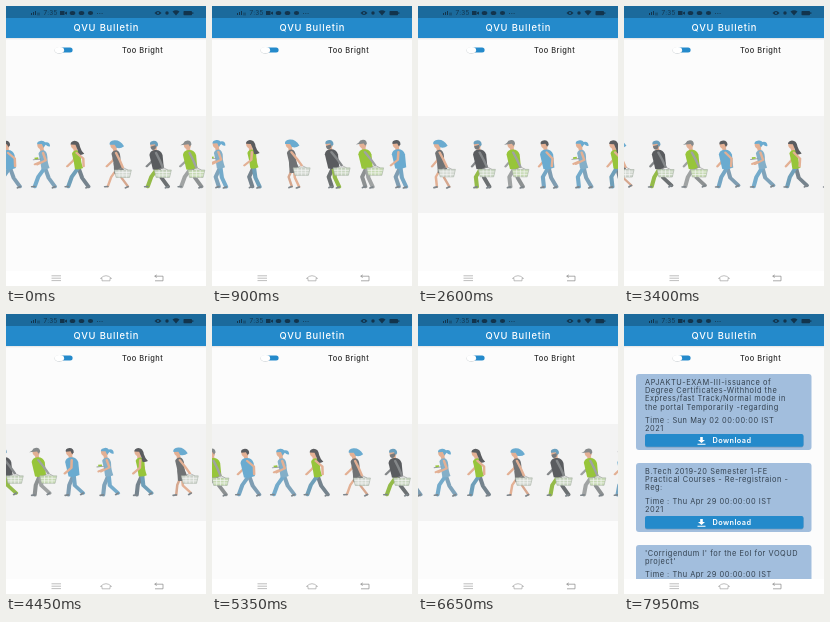
These frames come from a looping animation (200x280 px, 8 s). An HTML page:

```html
<!DOCTYPE html>
<html lang="en">
<head>
<meta charset="utf-8">
<title>Notices</title>
<style>
  html, body { margin: 0; width: 100%; height: 100%; overflow: hidden; background: #fcfcfc; }
  svg { display: block; width: 100%; height: 100%; }
  text { font-family: Inter, Roboto, sans-serif; }
  .body { font-size: 7.4px; letter-spacing: .54px; fill: #33414f; }
  .btn { font-size: 7.3px; font-weight: 600; letter-spacing: .45px; fill: #fff; }
  .limb { fill: none; stroke-linecap: round; stroke-linejoin: round; }
</style>
</head>
<body>
<svg viewBox="0 0 200 280">
  <defs>
    <clipPath id="stage"><rect y="110" width="200" height="97"/></clipPath>
    <linearGradient id="shade" x2="0" y2="1">
      <stop stop-color="#000" stop-opacity=".1"/><stop offset="1" stop-color="#000" stop-opacity="0"/>
    </linearGradient>
  </defs>
  <rect width="200" height="280" fill="#fcfcfc"/>

  <g id="walk" clip-path="url(#stage)">
    <rect y="110" width="200" height="97" fill="#f3f3f3"/>
    <g id="belt"><g id="row"></g><use href="#row" x="215"/></g>
  </g>
  <g id="list"></g>

  <rect y="32" width="200" height="2" fill="url(#shade)"/>
  <rect width="200" height="32" fill="#248acb"/>
  <rect width="200" height="12" fill="#1b6a9c"/>
  <text x="100.400" y="24.600" text-anchor="middle" font-size="9.4" font-weight="500" letter-spacing=".8" fill="#fff">QVU Bulletin</text>

  <g id="status" fill="#12344d">
    <path d="M25 9V7h1v2zM27 9V6h1v3zM29 9V5h1v4z"/>
    <path d="M31 7.2h3M31 8.8h3" stroke="#12344d" stroke-width=".6"/>
    <text x="37.5" y="9.4" font-size="6.4" letter-spacing=".3">7:35</text>
    <path d="M54 5h4.5v4H54zM59 6.4l2-1v3.4l-2-1z"/>
    <ellipse cx="66.5" cy="7" rx="2.8" ry="2.1"/>
    <ellipse cx="75.5" cy="7" rx="2.8" ry="2.1"/>
    <ellipse cx="84.5" cy="7" rx="2.6" ry="2"/>
    <path d="M91 7h1v.8h-1zM93.300 7h1v.8h-1zM95.600 7h1v.8h-1z"/>
    <path d="M148.500 7q3.500-4 7 0q-3.500 4-7 0z"/>
    <circle cx="152" cy="7" r="1" fill="#1b6a9c"/>
    <circle cx="161" cy="7" r="1.7"/>
    <path d="M166.500 5.500q3.500-2.600 7 0L170 9.500z"/>
    <rect x="177.500" y="5" width="8.500" height="4.200" rx=".8"/>
    <rect x="186.300" y="6.200" width="1" height="1.800"/>
  </g>

  <rect x="52" y="41.600" width="14.600" height="5" rx="2.500" fill="#248acb"/>
  <ellipse cx="53.300" cy="44.400" rx="4.900" ry="3.300" fill="#d0d5d8"/>
  <ellipse cx="53.300" cy="44" rx="4.700" ry="3.100" fill="#fff"/>
  <text x="116" y="46.600" font-size="7.4" font-weight="500" letter-spacing=".5" fill="#2a2a2a">Too Bright</text>

  <rect y="265" width="200" height="15" fill="#fff"/>
  <g fill="none" stroke="#a2a2a2" stroke-width=".7">
    <path d="M45.500 269.800h9.500M45.500 272.200h9.500M45.500 274.600h9.500"/>
    <path d="M96 274.800v-2.400h-1.500q5.500-5.400 11 0h-1.500v2.400z"/>
    <path d="M149 270.200h8v4.600h-8M150.800 268.900l-2.200 1.300l2.200 1.300" stroke="#888"/>
  </g>
</svg>
<script>
const LOOP = 8000, LIST_AT = 7250, SPEED = 34, PERIOD = 215, STEP = 334, LEAN = 8;
const $ = id => document.getElementById(id);
const SKIN = '#e3b094', BLUE = '#6aabd0', GREEN = '#97c53a', DARK = '#5a5c5f', GREY = '#9fa2a2', SHOE = '#7d858b';

// x: place in the row; hold: what the hands carry; legs: far, near
const people = [
  { x: 4, hair: DARK, top: BLUE, arm: SKIN, legs: ['#7f9db2', '#75a6c4'], style: 'short', broad: true },
  { x: 39, hair: BLUE, top: '#84afc8', arm: SKIN, legs: ['#7fa3ba', '#74abcb'], style: 'bun', hold: 'tray' },
  { x: 72.5, hair: DARK, top: GREEN, arm: SKIN, legs: ['#75838d', '#6f9fb9'], style: 'long' },
  { x: 112, hair: BLUE, top: '#707274', arm: SKIN, legs: ['#d6a78e', SKIN], style: 'bob', hold: '#d3d9d1', dress: true },
  { x: 152, hair: '#6a9fbd', top: DARK, arm: '#85888a', legs: ['#6c7072', '#94bb48'], style: 'short', beard: true, broad: true, hold: '#c8d6bf' },
  { x: 185.5, hair: '#868a8b', top: GREEN, arm: GREY, legs: ['#8d9192', '#a0a3a3'], style: 'cap', broad: true, hold: '#c6dab2' },
];

const hairs = {
  short: 'M-3-23.500Q-3.400-27 .400-27Q3.800-26.600 3.200-22L1.600-20.500L.800-23.500Z',
  bun: 'M-3-24Q-2.600-27 .600-27Q3-27 3.600-25Q7.500-25.500 7-20.500Q5-20 3.800-22.500L1.600-20L.800-23.600Z',
  long: 'M-3-23.800Q-2.600-27 .600-27Q4.400-26.500 4.200-20Q4.500-16 6.500-13Q3.500-11.500 2-13Q2-18 .800-23Z',
  bob: 'M-3.400-23.500Q-3.600-27.400 1-27.400Q5.500-27.200 7.800-20.500Q4.500-18 1.600-19.800L.600-23Z',
  cap: 'M-5.600-23.400Q-3.400-24.600-3-25Q-2-27.400 .600-27.200Q3.600-27 3.200-22.800L1.600-21L.800-23.400Z',
};
const BROAD = 'M-5-13.500Q-4-17.500 0-17.700Q4.600-17.700 5.400-12L4.600 1Q0 3-4.300 1.200Z';
const SLIM = 'M-3.200-14.500Q-2-17.500 1-17.300Q4-16.500 3.400-10Q2.600-6 3.600 1Q0 2.600-3 1Q-2.600-7-3.200-14.500Z';

const limb = (color, w) => `<path class="limb" stroke="${color}" stroke-width="${w}"/>`;
const solid = (d, color) => `<path d="${d}" fill="${color}"/>`;

function figure(p) {
  const leg = c => limb(c, p.dress ? 2 : 3.3) + limb(SHOE, 1.6);
  const basket = p.hold && p.hold !== 'tray'
    ? `<g class="basket"><path d="M-4 2.500L0 0L4 2.500" fill="none" stroke="#999" stroke-width=".6"/>
       <path d="M-6.800 2.500H6.800L5.400 10H-5.400Z" fill="${p.hold}" stroke="#a3ada0" stroke-width=".5"/>
       <path d="M-6 5H6M-5.600 7.500H5.600M-3 2.500V10M0 2.500V10M3 2.500V10" stroke="#f6f6f6" stroke-width=".6"/></g>` : '';
  const tray = p.hold === 'tray'
    ? `<path d="M-8.500-9H-2" stroke="#8f989e" stroke-width=".9"/>` + solid('M-7-11H-4V-9.300H-7Z', GREEN) : '';
  return `<g>${leg(p.legs[0])}${leg(p.legs[1])}
    <g transform="rotate(${-LEAN})">${limb(p.arm, 2)}
    ${solid('M-1.600-20.500H1.600V-16H-1.400Z', SKIN)}
    ${solid(p.broad ? BROAD : SLIM, p.top)}
    ${p.dress ? solid('M-2.800-5L3-5L4.800 5.500Q1 7-3.800 5.500Z', p.top) : ''}
    <ellipse cx="-.2" cy="-22.500" rx="2.800" ry="3.500" fill="${SKIN}"/>
    ${p.beard ? solid('M-3-21.500L1.400-22.500Q1.600-18-1.400-18Q-3.200-18.500-3-21.500Z', '#77797b') : ''}
    ${solid(hairs[p.style], p.hair)}${tray}${basket}${limb(p.arm, 2)}</g></g>`;
}

$('row').innerHTML = people.map(figure).join('');
const men = [...$('row').children].map((el, i) => ({
  el, p: people[i], limbs: el.querySelectorAll('.limb'), basket: el.querySelector('.basket')
}));

// Angles in degrees, positive forward (to the left)
const rad = d => d * Math.PI / 180;
const reach = ([x, y], deg, len) => [x - Math.sin(rad(deg)) * len, y + Math.cos(rad(deg)) * len];
const line = pts => 'M' + pts.map(q => q.map(n => n.toFixed(2)).join(' ')).join('L');

function setLeg(leg, shoe, ph) {
  const a = 7 + 23 * Math.cos(ph), bend = 14 + 26 * Math.max(0, -Math.sin(ph));
  const hip = [0, 0], knee = reach(hip, a, 10.8), ankle = reach(knee, a - bend, 10);
  leg.setAttribute('d', line([hip, knee, ankle]));
  shoe.setAttribute('d', line([ankle, reach(ankle, 75 + (a - bend) * .6, 2.4)]));
}

function setArm(arm, deg, bend) {
  const top = [.5, -14.8], elbow = reach(top, deg, 7.8), hand = reach(elbow, deg + bend, 7.8);
  arm.setAttribute('d', line([top, elbow, hand]));
  return hand;
}

function walk(t) {
  const ph = Math.PI * t / STEP, c = Math.cos(ph);
  $('belt').setAttribute('transform', `translate(${-(t / 1000 * SPEED) % PERIOD} 0)`);
  for (const { el, p, limbs, basket } of men) {
    const y = 161 + .6 * Math.cos(2 * ph);
    el.setAttribute('transform', `translate(${p.x} ${y}) scale(1.25 1)`);
    setLeg(limbs[0], limbs[1], ph + Math.PI);
    setLeg(limbs[2], limbs[3], ph);
    if (p.hold === 'tray') {
      setArm(limbs[4], 5, 65);
      setArm(limbs[5], -8, 75);
    } else {
      setArm(limbs[4], 26 * c, 22);
      const hand = basket ? setArm(limbs[5], -21 + 7 * c, 3) : setArm(limbs[5], -6 - 30 * c, 42);
      if (basket) basket.setAttribute('transform', `translate(${hand[0]} ${hand[1]}) rotate(${LEAN})`);
    }
  }
}

const cards = [
  { y: 60, h: 76, btn: 120, time: 108.7, date: 'Sun May 02', lines: ['APJAKTU-EXAM-III-issuance of',
    'Degree Certificates-Withhold the', 'Express/fast Track/Normal mode in', 'the portal Temporarily -regarding'] },
  { y: 149, h: 69, btn: 202, time: 189.8, date: 'Thu Apr 29', lines: ['B.Tech 2019-20 Semester 1-FE',
    'Practical Courses - Re-registraion -', 'Reg:'] },
  { y: 231, h: 49, time: 262.8, date: 'Thu Apr 29', lines: ["'Corrigendum I' for the EoI for VOQUD", "project'"] },
];
const label = (s, y) => `<text class="body" x="21" y="${y}">${s}</text>`;
const button = y => `<rect x="21" y="${y + .6}" width="158.500" height="12.800" rx="2" fill="#7e9dbd"/>
  <rect x="21" y="${y}" width="158.500" height="12.700" rx="2" fill="#248acb"/>
  <path d="M76.200 ${y + 3}h2.600v3h2.200l-3.500 3l-3.500-3h2.200zM73.500 ${y + 9.7}h8v1h-8z" fill="#fff"/>
  <text class="btn" x="88.500" y="${y + 9}">Download</text>`;

$('list').innerHTML = cards.map(c =>
  `<rect x="12" y="${c.y}" width="175.500" height="${c.h}" rx="3" fill="#a2bedd"/>` +
  c.lines.map((s, i) => label(s, c.y + 10.8 + i * 8.3)).join('') +
  label(`Time : ${c.date} 00:00:00 IST`, c.time) +
  (c.btn ? label('2021', c.time + 8.2) + button(c.btn) : '')).join('');

function draw(t) {
  const listed = t >= LIST_AT;
  $('walk').style.display = listed ? 'none' : '';
  $('list').style.display = listed ? '' : 'none';
  if (!listed) walk(t);
}

const start = performance.now();
function tick() {
  draw((performance.now() - start) % LOOP);
  requestAnimationFrame(tick);
}
draw(0);
requestAnimationFrame(tick);
</script>
</body>
</html>
```
